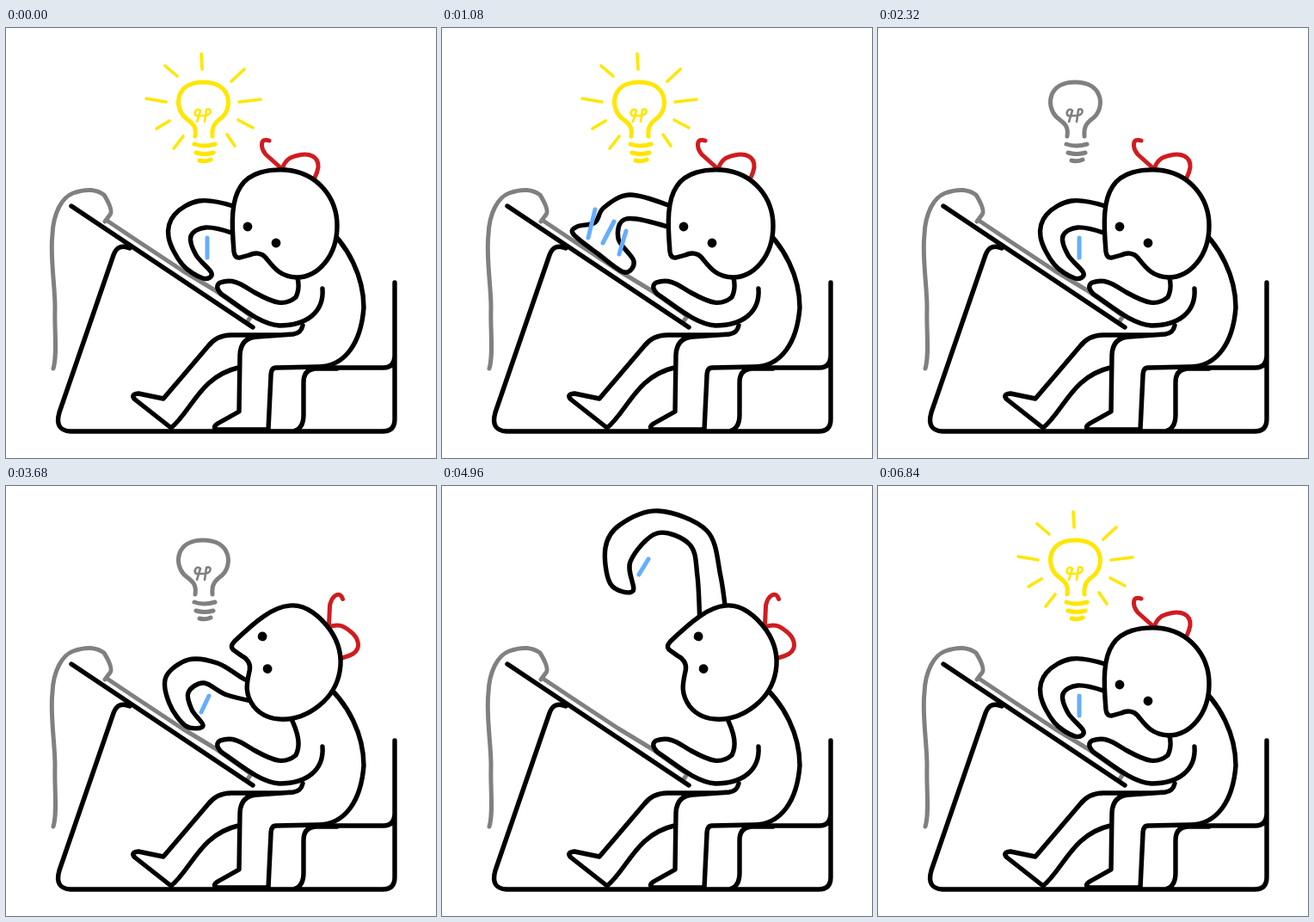
These frames come from a looping animation (500 by 500 pixels, 6920 ms). An HTML page with a canvas:

```html
<!DOCTYPE html>
<html lang="en">
<head>
<meta charset="utf-8">
<title>Idea at the desk</title>
<style>
html, body { margin: 0; height: 100%; overflow: hidden; background: #fff; }
canvas { display: block; width: 100vw; height: 100vh; }
</style>
</head>
<body>
<canvas id="stage" width="500" height="500"></canvas>
<script>
const ctx = document.getElementById('stage').getContext('2d');
const LOOP = 6920;
const INK = '#000', GREY = '#808080', YELLOW = '#ffe600', RED = '#d01c1f', BLUE = '#66adff';

const cord = new Path2D(`M55 396C60 380 56 350 57 325C57 300 51 265 54 240C55 215 65 197 78 192
  C95 186 105 188 114 194C117 199 125 212 121 217L115 225M119 225L155 249L205 282L243 305L285 335L281 341`);
const desk = new Path2D(`M76 207L287 348M144 256Q130 250 125 264L62 447Q56 468 75 469H438Q452 469 452 455V296
  M452 380Q452 395 439 395H365M385 396H360Q346 397 346 412V450Q346 466 334 469`);
const body = new Path2D(`M365 225C400 252 416 292 416 325C413 365 395 394 362 394L314 395Q308 395 308 405L305 467
  H246Q239 465 246 460L271 446L272 380Q273 360 292 359L334 356Q343 355 345 346
  M320 357H262Q245 357 235 370L183 431L154 425Q144 426 150 432L192 465C216 445 226 405 270 395`);
const restingArm = new Path2D(`M368 303C370 330 350 346 318 346C295 344 275 326 250 309Q242 300 249 296
  C267 290 277 301 290 308C312 320 324 324 337 313C342 303 342 290 329 265`);
const head = new Path2D(`M265 260C262 225 262 200 273 184C283 168 305 164 325 165C362 168 385 197 385 230
  C385 266 362 290 338 290C318 289 311 278 302 267C297 261 289 261 283 264L272 267Q266 268 265 260Z`);
const hair = new Path2D(`M306 131C296 127 295 138 302 147L321 164C325 153 330 150 340 148
  C352 145 364 149 363 162Q362 168 359 174`);
const bulb = new Path2D(`M220 126C222 112 215 110 207 103C195 90 198 63 229 63C262 63 264 92 251 104
  C243 110 239 114 240 126M219 135Q230 139 243 135M221 145Q231 148 241 145M225 154Q232 156 238 153`);
const filament = new Path2D('M222 109L226 96C221 92 218 99 221 102H231C240 101 239 92 233 95L231 109');
const rays = new Path2D(`M227 30L228 48M185 44L199 56M277 48L262 62M163 82L186 86M271 86L296 83
  M175 117L190 108M270 107L287 116M206 126L195 140M257 124L266 137`);

// Arm outlines run from the shoulder around the hand and back; pens are x1, y1, x2, y2.
const pose = (arm, ...pens) => ({ arm, pens });
const draw = pose([292,222, 264,207, 225,201, 196,217, 189,243, 205,275, 229,291, 239,285, 221,264, 215,242,
  232,232, 262,238, 292,252], [234,244,234,267]);
const left = pose([292,222, 263,206, 222,190, 188,197, 166,217, 144,227, 140,236, 152,243, 176,238, 192,225,
  220,217, 262,231, 292,246], [168,205,161,232]);
const sweep = pose([292,222, 263,206, 218,194, 188,209, 178,226, 157,231, 153,240, 182,263, 212,284, 223,271,
  205,245, 214,222, 262,231, 292,246], [178,211,170,244], [200,225,187,250], [214,236,206,263]);
const lift = pose([300,236, 276,224, 246,206, 212,202, 186,222, 190,253, 209,279, 229,279, 216,260, 212,240,
  230,229, 257,243, 295,252], [236,244,227,263]);
const grab = pose([295,240, 268,250, 240,248, 222,232, 218,205, 222,172, 211,162, 199,170, 189,205, 194,252,
  220,281, 262,285, 305,272], [236,170,226,190]);
const toss = pose([290,200, 262,198, 238,182, 222,155, 218,120, 224,82, 212,68, 199,76, 190,120, 197,168,
  218,204, 252,226, 292,229], [236,85,226,105]);
const over = pose([332,165, 324,105, 308,52, 252,29, 207,45, 190,72, 196,114, 222,122, 219,88, 250,55,
  288,68, 297,105, 300,165], [240,85,229,103]);
const fit = pose([347,165, 340,95, 316,42, 268,16, 226,26, 203,48, 204,66, 220,68, 232,54, 265,44,
  296,62, 312,105, 316,165], [244,52,234,66]);
const under = pose([290,208, 262,206, 245,198, 236,188, 232,176, 228,166, 217,163, 206,171, 203,190, 211,213,
  229,230, 256,238, 292,238], [240,172,231,190]);
const lower = pose([300,232, 276,218, 246,194, 214,188, 189,206, 192,236, 208,266, 229,268, 218,247, 213,228,
  230,217, 257,231, 295,250], [236,226,230,246]);

// First change, last change, number of changes, resulting pose
const moves = [
  [3680, 3680, 1, lift], [3760, 3920, 3, grab], [4280, 4480, 5, toss], [4760, 4960, 4, over],
  [5280, 5280, 1, fit], [5600, 5600, 1, under], [5920, 5920, 1, lower], [6640, 6840, 4, draw]
];

function stepped(t, start, end, count) {
  if (t < start) return 0;
  if (t >= end) return 1;
  return (1 + Math.floor((t - start) / (end - start) * (count - 1))) / count;
}

const mixList = (a, b, k) => a.map((v, i) => v + (b[i] - v) * k);
const mix = (a, b, k) => pose(mixList(a.arm, b.arm, k), mixList(a.pens[0], b.pens[0], k));

function armPose(t) {
  if (t >= 160 && t < 2320) {
    const phase = (t - 160) % 200;
    return phase < 80 ? left : phase < 160 ? sweep : draw;
  }
  let current = draw;
  for (const [start, end, count, next] of moves) {
    const k = stepped(t, start, end, count);
    if (k === 0) break;
    current = k === 1 ? next : mix(current, next, k);
  }
  return current;
}

function stroke(path, color = INK, width = 5.4) {
  ctx.strokeStyle = color;
  ctx.lineWidth = width;
  ctx.stroke(path);
}

// Catmull-Rom curve through a flat list of coordinates
function smooth(list) {
  const n = list.length / 2;
  const at = i => {
    const j = 2 * Math.max(0, Math.min(n - 1, i));
    return [list[j], list[j + 1]];
  };
  const path = new Path2D();
  path.moveTo(...at(0));
  for (let i = 0; i < n - 1; i++) {
    const [p, a, b, q] = [at(i - 1), at(i), at(i + 1), at(i + 2)];
    path.bezierCurveTo(a[0] + (b[0] - p[0]) / 6, a[1] + (b[1] - p[1]) / 6,
      b[0] - (q[0] - a[0]) / 6, b[1] - (q[1] - a[1]) / 6, b[0], b[1]);
  }
  return path;
}

function drawBulb(t) {
  const rise = stepped(t, 4280, 4480, 5);
  if (rise === 1 && t < 5280) return;
  const lit = t < 1360 || t >= 5920;
  const color = lit ? YELLOW : GREY;
  ctx.save();
  if (t < 5280) ctx.translate(0, -170 * rise);
  stroke(bulb, color, 5);
  stroke(filament, color, 2.6);
  if (lit) stroke(rays, color, 3.6);
  ctx.restore();
}

function drawArm(t) {
  const { arm, pens } = armPose(t);
  const outline = smooth(arm);
  ctx.fillStyle = '#fff';
  ctx.fill(outline);
  stroke(outline);
  for (const [x1, y1, x2, y2] of pens) stroke(new Path2D(`M${x1} ${y1}L${x2} ${y2}`), BLUE, 5);
}

function drawHead(t) {
  const up = stepped(t, 3040, 3240, 4) - stepped(t, 6640, 6840, 4);
  ctx.save();
  ctx.translate(348.3, 220.9);
  ctx.rotate(up * 51 * Math.PI / 180);
  ctx.translate(-348.3, -220.9);
  stroke(hair, RED, 5);
  ctx.fillStyle = '#fff';
  ctx.fill(head);
  stroke(head);
  ctx.fillStyle = INK;
  for (const [x, y] of [[281, 231], [314, 250]]) {
    ctx.beginPath();
    ctx.arc(x, y, 5.4, 0, 2 * Math.PI);
    ctx.fill();
  }
  ctx.restore();
}

function render(now) {
  const t = now % LOOP;
  ctx.fillStyle = '#fff';
  ctx.fillRect(0, 0, 500, 500);
  ctx.lineCap = ctx.lineJoin = 'round';
  stroke(cord, GREY, 5);
  stroke(desk);
  stroke(body);
  stroke(restingArm);
  drawBulb(t);
  drawArm(t);
  drawHead(t);
}

const begin = performance.now();
function tick() {
  render(performance.now() - begin);
  requestAnimationFrame(tick);
}
tick();
</script>
</body>
</html>
```
